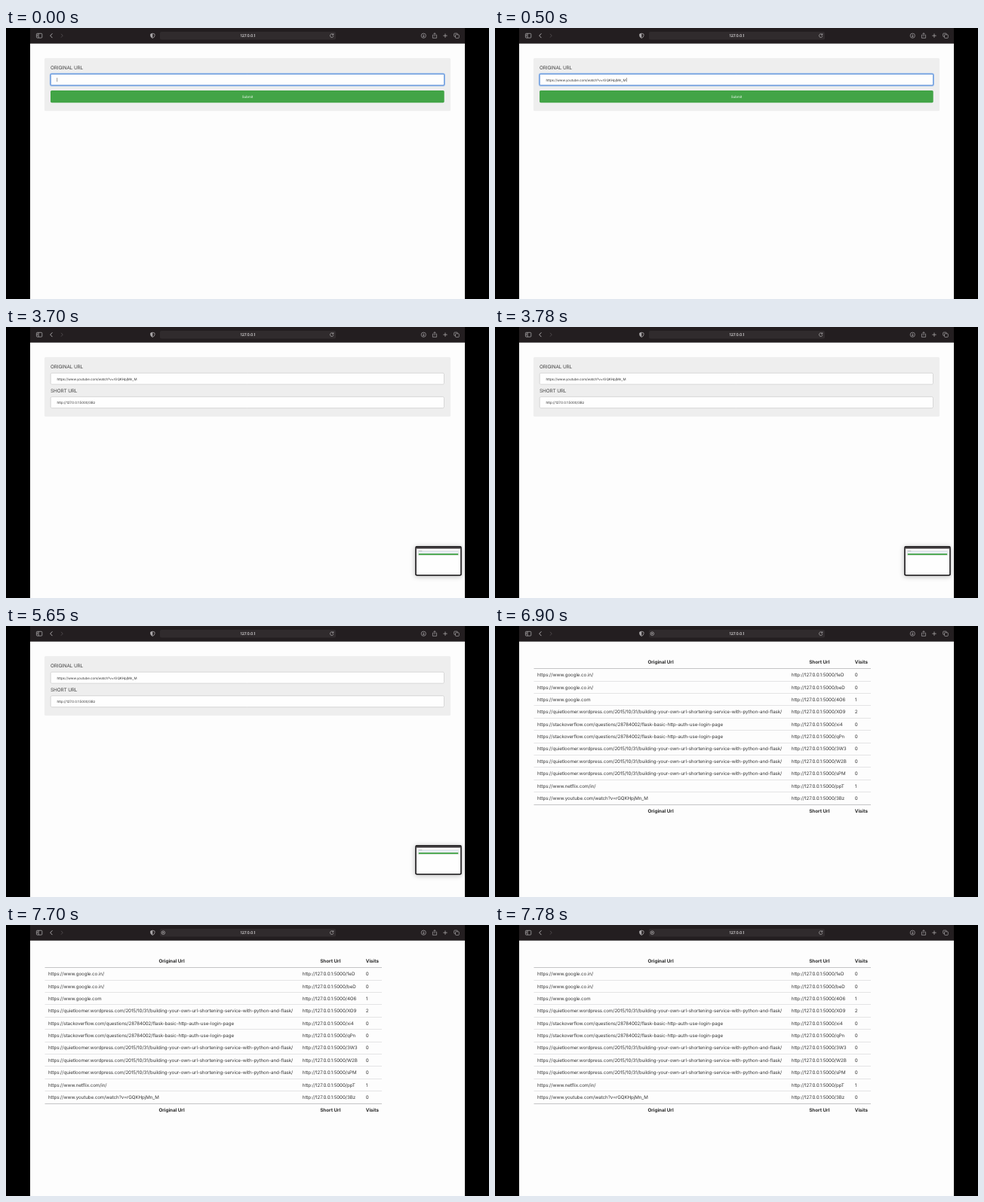
An HTML page with a canvas that plays this animation: 640 by 360 pixels, repeating every 8000 ms.

```html
<!DOCTYPE html>
<html lang="en">
<head>
<meta charset="utf-8">
<title>URL shortener</title>
<style>
  html, body { margin: 0; width: 100%; height: 100%; overflow: hidden; background: #000; }
  canvas { display: block; width: 640px; height: 360px; }
</style>
</head>
<body>
<canvas id="stage"></canvas>
<script>
const LOOP = 8000, TYPED = 500, SHORTENED = 3700, LISTED = 6900;
const FONT = 'Inter, "Noto Sans", sans-serif';
const canvas = document.getElementById('stage');
const ctx = canvas.getContext('2d');
const ratio = window.devicePixelRatio || 1;
canvas.width = 640 * ratio;
canvas.height = 360 * ratio;

const VIDEO = 'https://www.youtube.com/watch?v=rGQKHpjMn_M';
const HOST = 'http://127.0.0.1:5000/';
const BLOG = 'https://quietloomer.wordpress.com/2015/10/31/building-your-own-url-shortening-service-with-python-and-flask/';
const QUESTION = 'https://stackoverflow.com/questions/28784002/flask-basic-http-auth-use-login-page';
const ROWS = [
  ['https://www.google.co.in/', '1eD', 0],
  ['https://www.google.co.in/', 'beD', 0],
  ['https://www.google.com', '4O6', 1],
  [BLOG, 'XO9', 2],
  [QUESTION, 'xi4', 0],
  [QUESTION, 'qPn', 0],
  [BLOG, '3W3', 0],
  [BLOG, 'W2B', 0],
  [BLOG, 'sPM', 0],
  ['https://www.netflix.com/in/', 'ppT', 1],
  [VIDEO, '3Bz', 0]
];

function rect(x, y, w, h, color) {
  ctx.fillStyle = color;
  ctx.fillRect(x, y, w, h);
}

function roundPath(x, y, w, h, r) {
  ctx.beginPath();
  ctx.roundRect(x, y, w, h, r);
}

function box(x, y, w, h, r, fill) {
  roundPath(x, y, w, h, r);
  ctx.fillStyle = fill;
  ctx.fill();
}

function outline(x, y, w, h, r, color, width) {
  roundPath(x, y, w, h, r);
  ctx.strokeStyle = color;
  ctx.lineWidth = width;
  ctx.stroke();
}

function text(str, x, y, size, { color = '#363636', weight = 400, align = 'left', spacing = -0.07 } = {}) {
  ctx.font = `${weight} ${size}px ${FONT}`;
  ctx.letterSpacing = spacing + 'px';
  ctx.textRendering = 'geometricPrecision';
  ctx.textAlign = align;
  ctx.fillStyle = color;
  ctx.fillText(str, x, y);
}

function icon(path, color = '#aaa7a9', width = 0.8) {
  ctx.strokeStyle = color;
  ctx.lineWidth = width;
  ctx.stroke(new Path2D(path));
}

function toolbar(listing) {
  rect(32, 0, 576, 20.7, '#231e20');
  box(204, 5, 233, 10.4, 2, '#302b2d');
  outline(40.4, 7.3, 7.4, 5.8, 1, '#aaa7a9', 0.8);
  icon('M43 7.3V13.1 M41.2 9H42.3 M41.2 10.4H42.3');
  icon('M61.4 7.3L58.7 10.2L61.4 13.1', '#bcb9bb', 0.9);
  icon('M73 7.8L75.2 10.2L73 12.6', '#565154');

  icon('M194.3 7.2L197 8.1V10.4Q196.8 12.3 194.3 13.4Q191.8 12.3 191.6 10.4V8.1Z');
  ctx.fillStyle = '#aaa7a9';
  ctx.fill(new Path2D('M194.3 7.2V13.4Q191.8 12.3 191.6 10.4V8.1Z'));
  if (listing) {
    icon('M210.6 10.2A2.3 2.3 0 1 1 206 10.2A2.3 2.3 0 1 1 210.6 10.2');
    ctx.beginPath();
    ctx.arc(208.3, 10.2, 0.9, 0, Math.PI * 2);
    ctx.fill();
  }
  text('127.0.0.1', 320.5, 12.1, 5.1, { color: '#f1eff0', weight: 500, align: 'center', spacing: 0 });
  icon('M433.6 8.8A2.3 2.3 0 1 0 434 10.6 M433.9 7.3V9.1H432');

  icon('M556.4 10.2A3.1 3.1 0 1 1 550.2 10.2A3.1 3.1 0 1 1 556.4 10.2 M553.3 8.4V11.8 M551.9 10.5L553.3 11.9L554.7 10.5', undefined, 0.7);
  icon('M566.6 9.2H565.4V13.3H570.6V9.2H569.4 M568 11.2V6.8 M566.6 8L568 6.6L569.4 8', undefined, 0.7);
  icon('M579.3 10.2H584.7 M582 7.5V12.9');
  outline(593.7, 7.1, 4.6, 4.4, 0.8, '#aaa7a9', 0.7);
  box(595.5, 8.8, 4.8, 4.6, 0.8, '#231e20');
  outline(595.5, 8.8, 4.8, 4.6, 0.8, '#aaa7a9', 0.7);
}

function field(y, value) {
  box(59, y, 521.7, 15.4, 1.6, '#fefefe');
  outline(59.2, y + 0.2, 521.3, 15, 1.6, '#c9c9c9', 0.7);
  text(value, 67.5, y + 9.5, 4.5);
}

function caption(str, y) {
  text(str, 59, y, 6.4, { color: '#444', spacing: -0.1 });
}

function entryForm(typed) {
  box(51, 40, 538, 70.3, 1.6, '#eeeeee');
  caption('ORIGINAL URL', 55.4);
  field(61, typed ? VIDEO : '');
  outline(58.8, 60.8, 522.2, 15.7, 1.8, '#a9c5ec', 2);
  outline(59, 61, 521.8, 15.3, 1.6, '#5f93dc', 1);
  rect(typed ? 174 : 67.5, 66.2, 0.6, 5.2, '#555');
  box(59, 83, 521.7, 16.2, 1.6, '#42a446');
  text('Submit', 320, 92.8, 4.5, { color: '#f4faf4', align: 'center' });
}

function thumbnail() {
  ctx.save();
  ctx.shadowColor = 'rgba(0,0,0,.28)';
  ctx.shadowBlur = 7 * ratio;
  ctx.shadowOffsetY = ratio;
  box(542.2, 291, 61.6, 39.6, 2, '#161416');
  ctx.restore();
  box(543.8, 292.4, 58.4, 36.7, 0.8, '#fefefe');
  rect(543.8, 292.4, 58.4, 2, '#2b2729');
  rect(546, 296.4, 54, 7.4, '#ececec');
  rect(546.8, 297.2, 4.5, 0.6, '#aaa');
  rect(546.8, 298.6, 52.4, 1.6, '#b6cdee');
  rect(547, 299, 52, 0.8, '#fefefe');
  rect(546.8, 301, 52.4, 1.8, '#42a446');
}

function resultForm() {
  box(51, 40, 538, 79, 1.6, '#eeeeee');
  caption('ORIGINAL URL', 55.4);
  field(61, VIDEO);
  caption('SHORT URL', 87);
  field(92.5, HOST + '3Bz');
  thumbnail();
}

function headings(y) {
  const style = { weight: 700, align: 'center', color: '#2c2c2c', spacing: -0.03 };
  text('Original Url', 219.5, y, 6.3, style);
  text('Short Url', 429.8, y, 6.3, style);
  text('Visits', 485.4, y, 6.3, style);
}

function listing() {
  const pitch = 16.38;
  headings(50.4);
  ROWS.forEach(([url, code, visits], i) => {
    const y = 67.2 + i * pitch;
    if (i) rect(51.5, Math.round(56.3 + i * pitch), 446.5, 1, '#e4e4e5');
    text(url, 56, y, 6.2);
    text(HOST + code, 392.8, y, 6.2);
    text(String(visits), 476.7, y, 6.2);
  });
  rect(51.5, 56, 446.5, 1, '#c4c4c5');
  rect(51.5, 237, 446.5, 1, '#c4c4c5');
  headings(247.7);
}

function draw(t) {
  ctx.setTransform(ratio, 0, 0, ratio, 0, 0);
  rect(0, 0, 640, 360, '#000');
  rect(32, 0, 576, 360, '#fdfdfd');
  toolbar(t >= LISTED);
  if (t < SHORTENED) entryForm(t >= TYPED);
  else if (t < LISTED) resultForm();
  else listing();
}

const start = performance.now();
function tick() {
  draw((performance.now() - start) % LOOP);
  requestAnimationFrame(tick);
}
tick();
</script>
</body>
</html>
```
